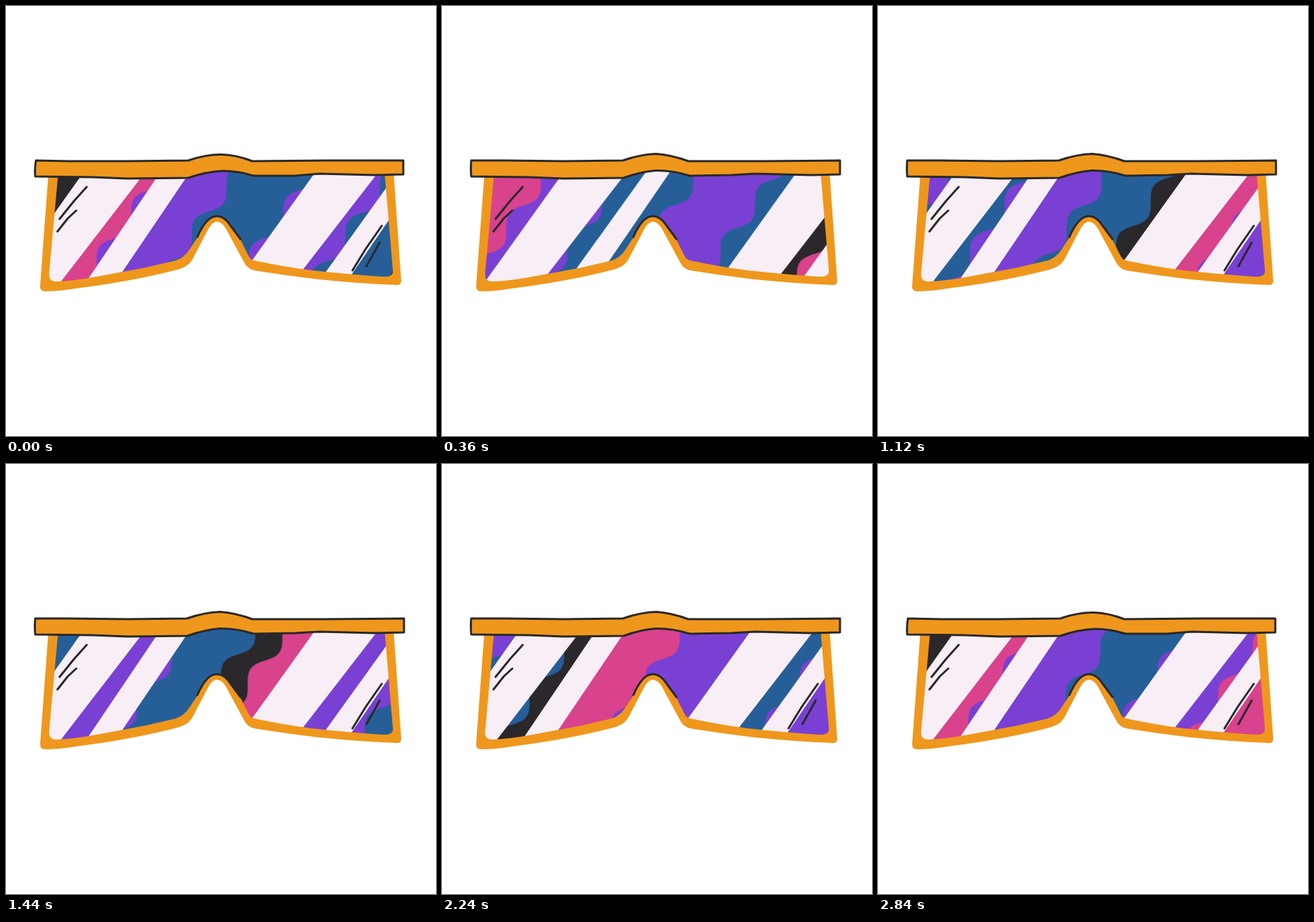
These frames come from a looping animation (618x618 px, 2.88 s). An HTML page:

```html
<!DOCTYPE html>
<html lang="en">
<head>
<meta charset="utf-8">
<title>Shades</title>
<style>
  html, body { margin: 0; width: 100%; height: 100%; overflow: hidden; background: #fff; }
  svg { display: block; width: 100%; height: 100%; }
  .ink { fill: none; stroke: #2a292a; stroke-width: 3; stroke-linecap: round; stroke-linejoin: round; }
  .bar { fill: #ef971c; }
  #bands { animation: drift 2.88s steps(72) infinite; }
  #glare { animation: sweep 2.88s infinite; }
  #glints { animation: blink 2.88s step-end infinite; }
  #barA { animation: poseA 2.88s step-end infinite; }
  #barB { animation: poseB 2.88s step-end infinite; }
  @keyframes drift { to { transform: translate(-301.2px, -381.6px); } }
  /* One quick pass of the reflections, then a long rest. */
  @keyframes sweep {
    0% { transform: none; animation-timing-function: cubic-bezier(.42, 0, .58, 1); }
    18.05% { transform: translateX(-335px); animation-timing-function: step-start; }
    18.06%, 100% { transform: none; }
  }
  @keyframes blink { 0% { opacity: 1; } 1.38% { opacity: 0; } 18.05% { opacity: 1; } }
  @keyframes poseA { 0% { opacity: 1; } 8.33% { opacity: 0; } 94.4% { opacity: 1; } }
  @keyframes poseB { 0% { opacity: 0; } 8.33% { opacity: 1; } 94.4% { opacity: 0; } }
</style>
</head>
<body>
<svg viewBox="0 0 618 618">
  <defs>
    <clipPath id="lens">
      <path d="M75 240L62 384Q61 396 72 396Q98 395 130 389L200 376L243 366Q256 362 263 351L275 333Q288 302 302 302Q314 302 323 315L337 336L348 358Q351 365 358 366Q400 375 440 380Q495 386 541 389Q557 390 556 380L544 238L350 232L308 226L262 236Z"/>
    </clipPath>
  </defs>
  <path class="bar" d="M61 240L49 403Q49 410 56 410Q78 410 100 406Q180 396 246 379Q262 375 268 364L290 322Q296 310 303 310Q310 310 316 320L342 368Q347 378 357 380Q400 387 450 393Q510 399 562 401Q568 401 568 395L557 238Z"/>
  <g clip-path="url(#lens)">
    <g id="bands"></g>
    <g id="glare" fill="#f7eff5"></g>
  </g>
  <path class="ink" d="M116 260L98 280L77 306M101 294L89 305L74 324"/>
  <path class="ink" id="glints" d="M540 316L517 349L498 380M537 340L518 374"/>
  <path class="ink" d="M275 332Q288 302 303 302Q314 302 323 316L337 335"/>
  <path class="ink bar" id="barA" d="M43 222L90 223L175 223L262 222Q288 213 310 213.500Q331 214 354 223L460 222L571 222L571 242L530 243L450 241L415 244L356 244Q333 237 312 237Q288 238 262 247L175 248L125 246L42 245Q41 233 43 222Z"/>
  <path class="ink bar" id="barB" d="M42 222L90 222L175 223L260 222Q286 213 308 212.500Q330 214 354 223L460 223L572 222L572 242L530 243L450 241L415 243L356 244Q331 236 307 236.500Q286 238 261 247L175 248L125 246L42 245Q41 233 42 222Z"/>
</svg>
<script>
  const pink = '#d9428d', purple = '#7a40d4', blue = '#265f98', black = '#2a282a';
  const slope = 0.72, top0 = 248, waveLength = 69, amplitude = 10;

  function addPath(id, d, fill) {
    const path = document.createElementNS('http://www.w3.org/2000/svg', 'path');
    path.setAttribute('d', d);
    if (fill) path.setAttribute('fill', fill);
    document.getElementById(id).append(path);
  }

  // Each band starts at a wavy diagonal edge and covers everything to its right.
  function wavyBand(start, crest) {
    const points = [];
    for (let y = 190; y <= 830; y += 3) {
      const bulge = amplitude * Math.cos(2 * Math.PI * (y - crest) / waveLength);
      const x = start - slope * (y - top0) + bulge * 0.812;
      points.push(x.toFixed(1) + ' ' + (y + bulge * 0.584).toFixed(1));
    }
    return 'M' + points.join('L') + 'L1800 830L1800 190Z';
  }

  addPath('bands', 'M-700 150H1800V850H-700Z', black);
  [
    [118, 250, pink], [217, 248, purple], [326, 278, blue], [435, 247, purple],
    [548, 280, blue], [640, 240, black], [685, 249, pink], [788, 284, purple],
    [902, 248, blue], [1008, 281, purple], [1121, 248, pink]
  ].forEach(([start, crest, color]) => addPath('bands', wavyBand(start, crest), color));

  // Reflections: left edge, right edge, and the slope of each.
  const bars = [
    [105, 193, .71, .77], [215.5, 258, .675, .677],
    [438, 528, .717, .774], [556, 591, .718, .684]
  ];
  const next = bars.slice(2).map(([l, r, a, b]) => [l + 335, r + 335, a, b]);
  [...bars, ...next].forEach(([left, right, a, b]) => {
    const at = (x, k, y) => (x - k * (y - top0)).toFixed(1) + ' ' + y;
    addPath('glare', `M${at(left, a, 210)}L${at(right, b, 210)}L${at(right, b, 420)}L${at(left, a, 420)}Z`);
  });
</script>
</body>
</html>
```
